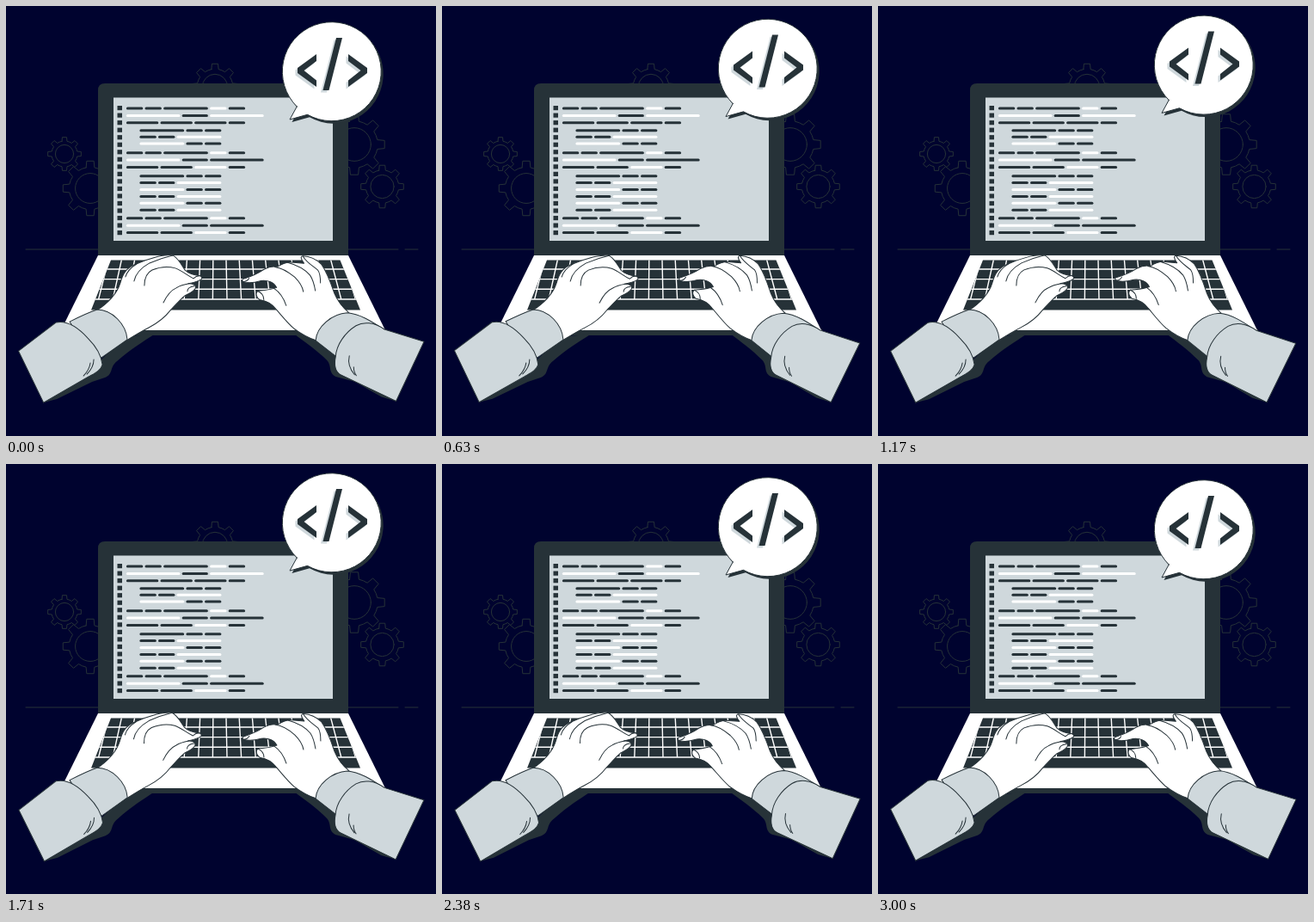
An HTML page that plays this animation: 500 px wide and 500 px high, repeating every 3040 ms.

```html
<!DOCTYPE html>
<html lang="en">
<head>
<meta charset="utf-8">
<title>Typing code</title>
<style>
  html, body { margin: 0; width: 100%; height: 100%; overflow: hidden; background: #00032f; }
  svg { display: block; width: 100%; height: 100%; }
  .dark { fill: #263238; }
  .pale { fill: #cfd8dc; }
  .white { fill: #fff; }
  .line { stroke: #263238; stroke-width: 1; stroke-linejoin: round; stroke-linecap: round; }
  .bare { fill: none; }
</style>
</head>
<body>
<svg viewBox="0 0 500 500">
  <defs>
    <clipPath id="board"><path d="M122 295.500H388.500L412 353.500H99Z"/></clipPath>
    <path id="balloon" d="M338.200 117L330 132L350.500 126.300A57.500 57.500 0 1 0 338.200 117Z"/>
    <path id="tag" d="M361 56L339 72V78L361 94V86.500L346.500 75L361 64ZM384 37H391L375.500 98H368.500Z
      M398 56L420 72V78L398 94V86.500L412.500 75L398 64Z"/>
  </defs>

  <g id="gears" class="line bare"></g>
  <path class="line bare" d="M23 283H456M464 283H479"/>

  <!-- laptop -->
  <path class="dark" d="M107 291V98Q107 90 115 90H390Q398 90 398 98V291Z"/>
  <rect class="pale" x="125" y="106.500" width="255" height="166.500"/>
  <g id="code" fill="none" stroke-width="3" stroke-linecap="round"></g>
  <path class="dark" d="M63 376H442V380Q442 383 437 383H68Q63 383 63 380Z"/>
  <path class="white" d="M107 290H398L441 377H64Z"/>
  <g clip-path="url(#board)">
    <rect class="dark" x="95" y="295" width="320" height="60"/>
    <path id="gaps" fill="none" stroke="#fff" stroke-width="1.400"/>
  </g>

  <g id="left">
    <path class="dark" d="M43 461L59 457L100 437L115 432C125 428 120 420 129 413C146 398 160 390 172 382L141 384L95 425Z"/>
    <path class="white line" d="M104 355C118 346 129 335 133 322C136 311 140 305 149 301C158 297 166 294 176 291.500
      C184 290 190 289 194 290C200 293 203 299 208 307C212 311 218 313 226 314Q229 316 227 318
      C222 321 217 322 212 323C218 323 222 325 220 329C217 333 212 335 208 337C202 342 198 347 192 353
      C185 362 176 369 166 374C156 379 148 384 140 389Z"/>
    <path class="line bare" d="M139 315C141 308 147 303 152 300M149 320C151 310 158 304 167 299C176 295 185 292 194 290
      M161 325C161 316 164 310 170 307C180 303 190 303 197 305C205 308 210 313 218 317
      M183 345C187 337 191 331 198 328C203 325 207 324 213 323M218 317Q222 313 227 314M211 332Q211 327 219 326"/>
    <path class="pale line" d="M74 367C84 362 94 357 106 353C123 353 140 370 141 388L111 409L95 400Z"/>
    <path class="pale line" d="M14.500 401L58 368C71 365 84 374 95 386C106 397 111 407 112 417C110 424 103 427 96 431L43.500 461Z"/>
    <path class="line bare" d="M102 411C102 419 98 424 94 428M98 415C97 422 94 426 90 430"/>
  </g>

  <g id="right">
    <path class="dark" d="M453 460L436 455L405 437L383 431C374 426 379 419 373 412C360 399 348 391 335 381L360 384L400 420Z"/>
    <path class="white line" d="M361 389C351 386 343 381 335 375C327 368 321 360 314 352C308 344 301 342 295 341
      C291 338 290 333 293 331C300 330 307 330 315 327C312 321 305 318 297 319C290 321 282 322 276 320
      Q274 317 277 316.500C285 314 294 310 300 306C306 303 311 302 316 303C322 299 329 297 335 298
      L347 299Q341 291 346 290.500C355 291 362 295 367 300C374 310 378 322 382 334C386 344 392 351 399 357Z"/>
    <path class="line bare" d="M313 303C322 304 329 309 336 315C342 321 345 326 346 332
      M328 298C339 301 348 306 354 313C358 319 359 325 360 331M346 291C350 298 357 302 363 307C366 311 366 317 366 322
      M312 328C318 332 323 339 326 348M293 331Q300 334 300 341M276 320Q281 320 283 316"/>
    <path class="pale line" d="M440 377C425 367 411 358 397 357C379 358 361 373 360 389L384 408L410 395Z"/>
    <path class="pale line" d="M486 391L440 376.500C428 368 416 367 407 372C394 380 384 394 383 408C381 418 383 426 389 429L453 460Z"/>
    <path class="line bare" d="M399 407C397 415 400 423 405 429M404 420Q404 426 407 430"/>
  </g>

  <g id="bubble">
    <use href="#balloon" class="dark" x="2.500" y="3"/>
    <use href="#balloon" class="white line"/>
    <use href="#tag" class="pale" x="-2.500" y="2.500"/>
    <use href="#tag" class="dark"/>
  </g>
</svg>

<script>
const LOOP = 3040;
const $ = id => document.getElementById(id);

function add(parent, tag, attrs) {
  const el = document.createElementNS('http://www.w3.org/2000/svg', tag);
  for (const k in attrs) el.setAttribute(k, attrs[k]);
  $(parent).append(el);
}

function gear(cx, cy, outer) {
  const teeth = 8, root = outer * 0.77, step = 2 * Math.PI / teeth;
  const at = (r, a) => `${cx + r * Math.cos(a)} ${cy + r * Math.sin(a)}`;
  let d = '';
  for (let i = 0; i < teeth; i++) {
    const a = i * step - Math.PI / 2;
    d += `${i ? 'L' : 'M'}${at(root, a - 0.2)}L${at(outer, a - 0.13)}L${at(outer, a + 0.13)}` +
      `L${at(root, a + 0.2)}A${root} ${root} 0 0 1 ${at(root, a + step - 0.2)}`;
  }
  add('gears', 'path', { d: d + 'Z' });
  add('gears', 'circle', { cx, cy, r: outer * 0.545 });
}
gear(68, 172, 19.5);
gear(98, 212, 32);
gear(243, 94, 27);
gear(405, 161, 35.5);
gear(437.5, 210, 25);

// A row is a list of word lengths; w marks a white word.
function block(x, y, gap, rows) {
  const unit = 1.8, space = 2.4, cap = 1.4;
  rows.forEach((row, i) => {
    let from = x;
    for (const word of row.split(' ')) {
      const white = word[0] === 'w';
      const to = from + unit * (white ? word.slice(1) : word);
      add('code', 'path', {
        d: `M${from + cap} ${y + i * gap}H${to - space - cap}`,
        stroke: white ? '#fff' : '#263238'
      });
      from = to;
    }
  });
}
const head = '12 12 30 w12 12', call = 'w36 18 36', tail = '22 22 w22 12';
const set = 'w30 12 12', open = '30 12 12', pair = '12 12 w30';
block(140, 119, 8.4, [head, 'w36 18 w36', '22 22 22 12']);
block(155.5, 144.7, 7.6, [open, pair, set]);
block(140, 170.7, 8.4, [head, call, tail]);
block(155.5, 197.7, 7.9, [open, pair, set, pair, set, pair]);
block(140, 246.8, 8.4, [head, call, tail]);
for (let i = 0; i < 18; i++) {
  add('code', 'rect', { x: 129.5, y: 116 + i * 8.53, width: 5.5, height: 5.2, class: 'dark' });
}

let gaps = '';
for (let i = 0; i < 4; i++) gaps += `M95 ${306 + 11.65 * i}H415`;
for (let k = -9; k <= 9; k++) gaps += `M${256 + 15.2 * k} 295L${257 + 16.6 * k} 341`;
$('gaps').setAttribute('d', gaps);

function draw(now) {
  const wave = (mid, size, peak) => mid + size * Math.cos(2 * Math.PI * (now - peak) / LOOP);
  const pose = (id, transform) => $(id).setAttribute('transform', transform);
  pose('bubble', `translate(0 ${wave(-4.2, 4.2, -40)})`);
  pose('left', `rotate(${wave(-0.3, 0.5, 560)} 130 370)`);
  pose('right', `rotate(${wave(-0.1, 0.75, 950)} 370 375)`);
}

const start = performance.now();
function tick() {
  draw(performance.now() - start);
  requestAnimationFrame(tick);
}
draw(0);
requestAnimationFrame(tick);
</script>
</body>
</html>
```
